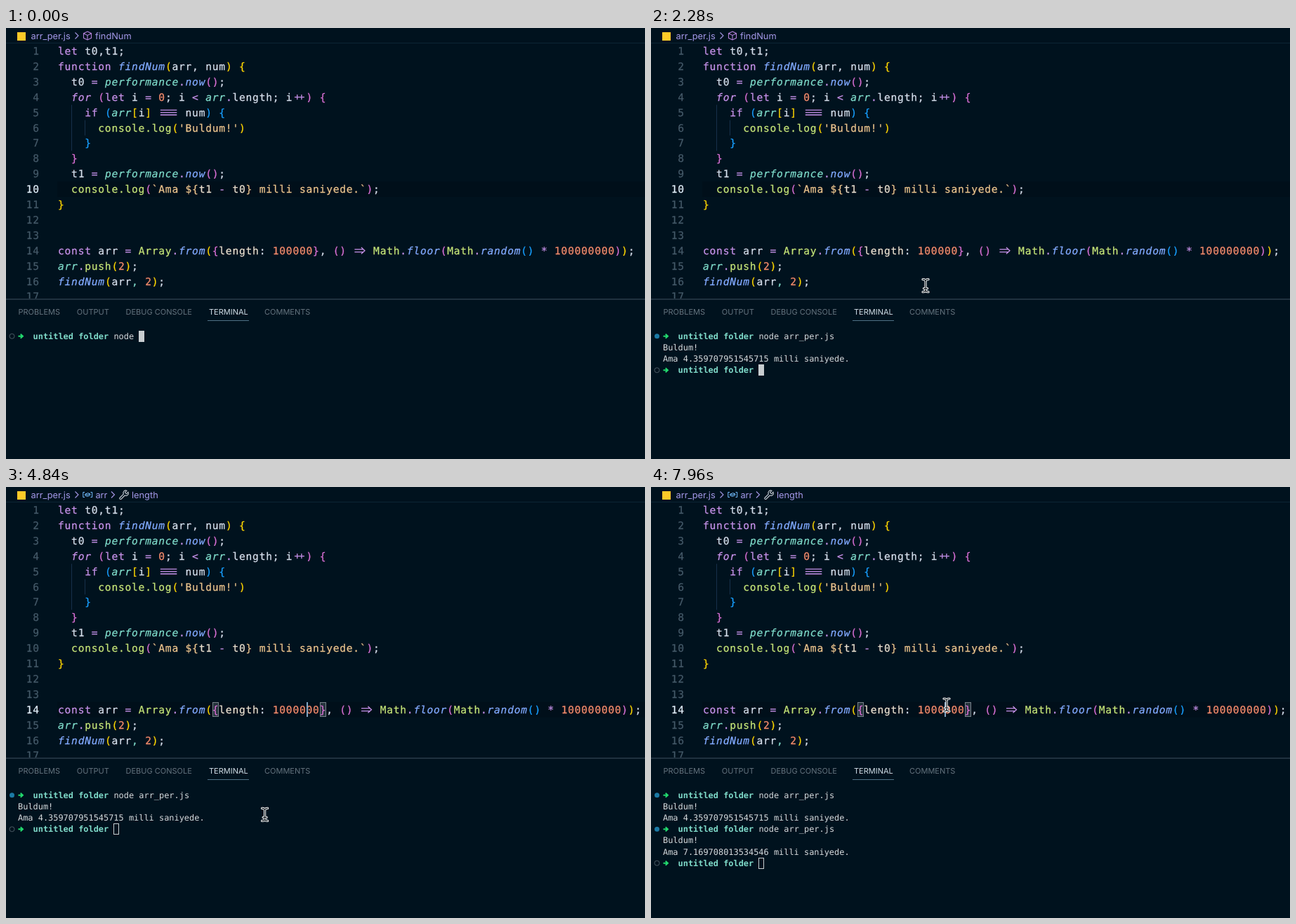
Recreate the animation shown at these times as an HTML page with a canvas. Size 910 by 615 pixels, loop 8 s.

```html
<!DOCTYPE html>
<html lang="tr">
<head>
<meta charset="utf-8">
<title>Timing an array search</title>
<style>
html, body { margin: 0; width: 100%; height: 100%; overflow: hidden; background: #00121e; }
canvas { display: block; width: 910px; height: 615px; }
</style>
</head>
<body>
<canvas id="stage" width="910" height="615"></canvas>
<script>
const ctx = document.getElementById('stage').getContext('2d');
const LOOP = 8000;

const BG = '#00121e';
const MONO = '"DejaVu Sans Mono", monospace';
const SANS = 'Inter, Roboto, sans-serif';

// Editor and terminal grids
const CODE = { x: 74, y: 38, w: 9.555, h: 21.9, size: 14.6, spacing: '0.765px' };
const TERM = { x: 17, y: 443.8, w: 7.18, h: 16.15, size: 11.93 };
const CODE_FONT = `${CODE.size}px ${MONO}`;

const COLORS = {
  p: '#c792ea', w: '#d6deeb', b: '#82aaff', t: '#7fdbca', g: '#c5e478',
  o: '#f78c6c', s: '#ecc48d', k: '#eadfcf',
  1: '#ffd700', 2: '#da70d6', 3: '#179fff'
};

// Events in ms
const T = {
  tab: 440, enter: 760, output: 920,
  click: 2640, zero: 3500, sashOn: 4120, sashOff: 4440,
  focusTerm: 5240, recall: 5680, enter2: 5960, output2: 6120,
  click2: 7680
};

// Each source line alternates style and text; an "i" prefix means italic
const timer = name => ['w', `  ${name} `, 'p', '= ', 'it', 'performance', 'p', '.', 'ib', 'now', '2', '()', 'w', ';'];
const sourceLines = len => [
  ['p', 'let', 'w', ' t0,t1;'],
  ['p', 'function ', 'ib', 'findNum', '1', '(', 'w', 'arr, num', '1', ') {'],
  timer('t0'),
  ['ip', '  for ', '2', '(', 'p', 'let', 'w', ' i ', 'p', '= ', 'o', '0', 'w', '; i ', 'p', '< ',
    'it', 'arr', 'p', '.', 'w', 'length; i', 'p', '++', '2', ') {'],
  ['p', '    if ', '3', '(', 'it', 'arr', '1', '[', 'w', 'i', '1', ']', 'w', ' ', 'p', '===', 'w', ' num', '3', ') {'],
  ['g', '      console.log', '1', '(', 's', "'Buldum!'", '1', ')'],
  ['3', '    }'],
  ['2', '  }'],
  timer('t1'),
  ['g', '  console.log', '2', '(', 's', '`Ama ${', 'k', 't1 ', 'p', '- ', 'k', 't0', 's', '} milli saniyede.`', '2', ')', 'w', ';'],
  ['1', '}'],
  [], [],
  ['p', 'const ', 'w', 'arr ', 'p', '= ', 'g', 'Array', 'p', '.', 'ib', 'from', '1', '(', '2', '{', 'k', 'length', 'w', ': ',
    'o', len, '2', '}', 'w', ', ', '2', '() ', 'p', '=>', 'g', ' Math', 'p', '.', 'ib', 'floor', '2', '(',
    'g', 'Math', 'p', '.', 'ib', 'random', '3', '() ', 'p', '* ', 'o', '100000000', '2', ')', '1', ')', 'w', ';'],
  ['it', 'arr', 'p', '.', 'g', 'push', '1', '(', 'o', '2', '1', ')', 'w', ';'],
  ['ib', 'findNum', '1', '(', 'w', 'arr', 't', ', ', 'o', '2', '1', ')', 'w', ';'],
  []
];

function rect(x, y, w, h, color) {
  ctx.fillStyle = color;
  ctx.fillRect(x, y, w, h);
}

function text(str, x, y, font, color) {
  ctx.font = font;
  ctx.fillStyle = color;
  ctx.fillText(str, x, y);
}

// Code has a slightly heavier stem than the plain font
function codeText(str, x, y, font, color) {
  text(str, x, y, font, color);
  ctx.strokeStyle = color;
  ctx.lineWidth = .25;
  ctx.strokeText(str, x, y);
}

function stroke(d, color, width = 1) {
  ctx.strokeStyle = color;
  ctx.lineWidth = width;
  ctx.stroke(new Path2D(d));
}

function ring(x, y, r, color, filled) {
  ctx.beginPath();
  ctx.arc(x, y, r, 0, 7);
  ctx.fillStyle = ctx.strokeStyle = color;
  ctx.lineWidth = 1;
  if (filled) ctx.fill(); else ctx.stroke();
}

const at = (x, y, draw) => {
  ctx.save();
  ctx.translate(x, y);
  draw();
  ctx.restore();
};

// Joined operators, drawn from the left edge and the middle of the row
const LIGATURES = {
  '===': 'M2.5 -3.4H26M2.5 0H26M2.5 3.4H26',
  '++': 'M2.5 0H16.5M6.3 -3.6V3.6M12.5 -3.6V3.6',
  '=>': 'M2 -1.9H15M2 1.9H15M11.5 -4.6L16.5 0L11.5 4.6'
};

function drawTokens(tokens, y) {
  let col = 0;
  for (let i = 0; i < tokens.length; i += 2) {
    const style = tokens[i], str = tokens[i + 1];
    const color = COLORS[style.slice(-1)];
    const x = CODE.x + col * CODE.w;
    if (LIGATURES[str]) at(x, y - 5, () => stroke(LIGATURES[str], color, 1.3));
    else codeText(str, x, y, (style[0] === 'i' ? 'italic ' : '') + CODE_FONT, color);
    col += str.length;
  }
}

const chevron = x => stroke(`M${x} 6.5L${x + 4.5} 11L${x} 15.5`, '#a599e9', 1.1);

function drawBreadcrumb(t) {
  const font = `12.8px ${SANS}`, violet = '#a599e9';
  rect(0, 21, 910, 1, '#0d2435');
  rect(16, 6, 12, 12, '#ffca28');
  text('arr_per.js', 35.5, 15.5, font, violet);
  chevron(98.5);
  if (t < T.click) {
    stroke('M116 5L121.5 7.7V14.3L116 17L110.5 14.3V7.7ZM110.5 7.7L116 10.5L121.5 7.7M116 10.5V17', '#b180d7', 1.1);
    text('findNum', 127, 15.5, font, violet);
    return;
  }
  stroke('M112 7.5H109.8V14.5H112M120.5 7.5H122.7V14.5H120.5M112.8 10.3L116.5 8.6L119.7 9.8V11.8L116 13.4L112.8 12.2ZM112.8 10.3L116 11.4L119.7 9.8', '#75beff', 1);
  text('arr', 127.4, 15.5, font, violet);
  chevron(150);
  stroke('M162 15.5L167.3 10.2C166 6.5 169 4 172 5.3L169.5 7.8L171.5 9.8L174 7.3C175.3 10.5 172.5 13.3 169.2 12L164 17.2C162.5 18 161.2 16.8 162 15.5Z', '#c5cbd3', 1.1);
  text('length', 179, 15.5, font, violet);
}

function drawLines(len, active) {
  ctx.letterSpacing = CODE.spacing;
  sourceLines(len).forEach((tokens, i) => {
    const n = i + 1, y = CODE.y + i * CODE.h;
    const x = CODE.x - (String(n).length + 2.75) * CODE.w + 0 * n;
    ctx.textAlign = 'right';
    codeText(n, 47.8, y, CODE_FONT, n === active ? '#e4f0fa' : '#455a69');
    ctx.textAlign = 'left';
    drawTokens(tokens, y);
  });
  ctx.letterSpacing = '0px';
}

function drawEditor(t) {
  const inEditor = (t >= T.click && t < T.focusTerm) || t >= T.click2;
  const active = t < T.click ? 10 : 14;
  const len = t < T.zero ? '100000' : '1000000';
  const rowTop = n => CODE.y + (n - 1) * CODE.h - 16;

  ctx.save();
  ctx.beginPath();
  ctx.rect(0, 22, 910, 364);
  ctx.clip();
  rect(73, rowTop(active), 837, CODE.h, '#000f1a');
  rect(93, rowTop(5), 1, CODE.h * 3, '#17304a');
  rect(112, rowTop(6), 1, CODE.h, '#17304a');

  if (inEditor) {
    for (const col of [23, 32 + len.length]) {
      const x = Math.round(CODE.x + col * CODE.w);
      rect(x, 307, 9, 21, '#26343d');
      ctx.strokeStyle = '#77828a';
      ctx.lineWidth = 1;
      ctx.strokeRect(x + .5, 307.5, 8, 20);
    }
  }

  drawLines(len, active);

  if (inEditor) {
    const typed = t >= T.zero && t < T.click2;
    const since = t - (t >= T.click2 ? T.click2 : typed ? T.zero : T.click);
    if (since % 1000 < 500) rect(Math.round(CODE.x + (typed ? 37 : 36) * CODE.w), 307, 2, 21, '#80a4c2');
  }
  ctx.restore();

  if (t >= T.sashOn && t < T.sashOff) rect(0, 384, 910, 4, '#10263a');
  else rect(0, 386.5, 910, 1, '#405160');
}

function drawTabs() {
  const tabs = [['PROBLEMS', 17.5], ['OUTPUT', 100.8], ['DEBUG CONSOLE', 170.5], ['TERMINAL', 289], ['COMMENTS', 368]];
  for (const [name, x] of tabs)
    text(name, x, 409.3, `11px ${SANS}`, name === 'TERMINAL' ? '#d2dee7' : '#64737e');
  rect(287, 417, 59, 1, '#4f7186');
}

const termY = row => TERM.y + row * TERM.h;

function termText(str, col, row, color = '#d6dadd', weight = '') {
  text(str, TERM.x + col * TERM.w, termY(row), `${weight} ${TERM.size}px ${MONO}`, color);
}

function drawPrompt(row, command, done) {
  const y = termY(row) - 4;
  ring(8.5, y, 3.5, done ? '#1b7aa5' : '#4c5a64', done);
  stroke(`M17.5 ${y}H23.5M20.7 ${y - 3}L24 ${y}L20.7 ${y + 3}`, '#22da6e', 1.9);
  termText('untitled folder', 3, row, '#7fdbca', 'bold');
  termText(command, 19, row);
}

function drawTermCursor(col, row, focused) {
  const x = Math.floor(TERM.x + col * TERM.w), y = Math.round(termY(row) - 12);
  if (focused) return rect(x, y, 8, 16, '#c8cdd0');
  ctx.strokeStyle = '#c8cdd0';
  ctx.lineWidth = 1;
  ctx.strokeRect(x + .5, y + .5, 7, 15);
}

function drawRun(row, ms) {
  termText('Buldum!', 0, row);
  termText(`Ama ${ms} milli saniyede.`, 0, row + 1);
}

function drawTerminal(t) {
  const full = 'node arr_per.js';
  const focused = t < T.click || (t >= T.focusTerm && t < T.click2);
  const first = t >= T.tab ? full : full.slice(0, 5 + Math.min(3, Math.floor(t / 120)));

  drawPrompt(0, first, t >= T.output);
  if (t < T.output) {
    if (t < T.enter) drawTermCursor(19 + first.length, 0, true);
    else drawTermCursor(0, 1, true);
    return;
  }
  drawRun(1, '4.359707951545715');

  const second = t >= T.recall ? full : '';
  drawPrompt(3, second, t >= T.output2);
  if (t < T.output2) {
    if (t < T.enter2) drawTermCursor(19 + second.length, 3, focused);
    else drawTermCursor(0, 4, true);
    return;
  }
  drawRun(4, '7.169708013534546');
  drawPrompt(6, '', false);
  drawTermCursor(19, 6, focused);
}

// Pointer trips: [time, x, y] stops; hidden between trips while typing
const TRIPS = [
  [[1880, 330, 476], [2520, 419, 318], [3500, 419, 318]],
  [[3760, 419, 318], [4080, 626, 384], [4320, 633, 385], [4440, 610, 392], [5080, 258, 502], [5680, 258, 502]],
  [[6920, 258, 502], [7560, 421, 318], [7900, 421, 311], [8000, 421, 311]]
];

function pointerAt(t) {
  for (const trip of TRIPS) {
    for (let i = 1; i < trip.length; i++) {
      const [t0, x0, y0] = trip[i - 1], [t1, x1, y1] = trip[i];
      if (t < t0 || t >= t1) continue;
      const u = (t - t0) / (t1 - t0), e = u * u * (3 - 2 * u);
      return [x0 + (x1 - x0) * e, y0 + (y1 - y0) * e];
    }
  }
  return null;
}

function drawPointer(t) {
  const pos = pointerAt(t);
  if (!pos) return;
  const resize = pos[1] > 381 && pos[1] < 390;
  const shape = resize
    ? 'M-7.5 0H7.5M0 -7.5V7.5M-3 -5L0 -8L3 -5M-3 5L0 8L3 5'
    : 'M-4 -9Q0 -9 0 -6Q0 -9 4 -9M0 -6V6M-4 9Q0 9 0 6Q0 9 4 9M-2.5 4H2.5';
  at(...pos, () => {
    ctx.lineCap = 'round';
    stroke(shape, '#fff', resize ? 4.2 : 3.2);
    stroke(shape, '#10181e', resize ? 1.8 : 1.2);
  });
}

function draw(t) {
  ctx.textRendering = 'geometricPrecision';
  rect(0, 0, 910, 615, BG);
  drawBreadcrumb(t);
  drawEditor(t);
  drawTabs();
  drawTerminal(t);
  drawPointer(t);
}

function frame() {
  draw(performance.now() % LOOP);
  requestAnimationFrame(frame);
}
frame();
</script>
</body>
</html>
```
